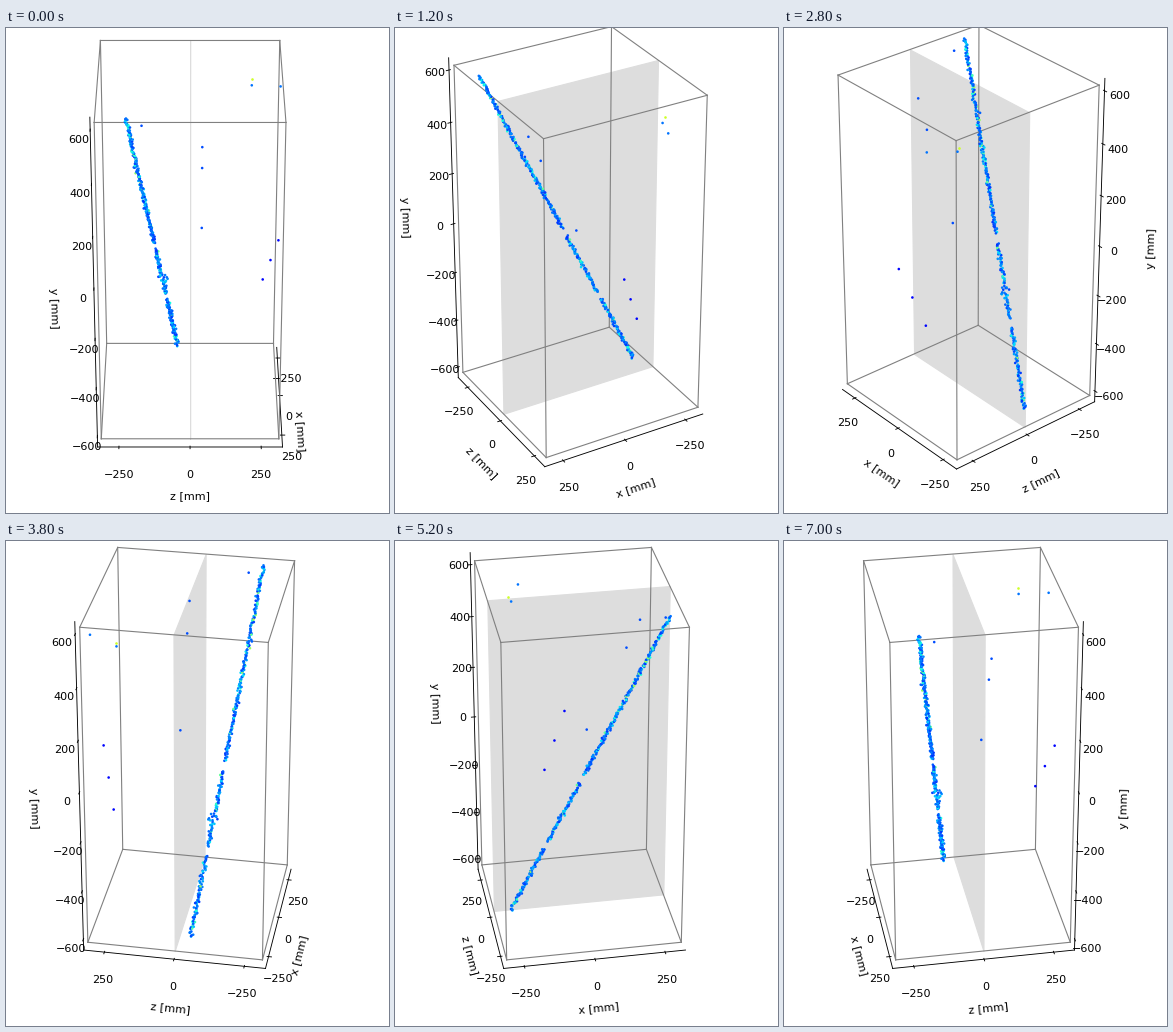
Write a matplotlib script that moves like this. It is 383 px wide and 485 px high and loops after 7.2 s.

```python
from itertools import combinations, product

import matplotlib.pyplot as plt
import numpy as np
from matplotlib.animation import FuncAnimation
from mpl_toolkits.mplot3d.art3d import Poly3DCollection

W, H, DPI = 383, 485, 80
STEPS, INTERVAL = 36, 200
HALF = np.array([310, 312, 620])    # half sizes of the box along x, z, y
MARGIN = 25 / 24                    # axis limits relative to the box
SIDE, LEFT, BOTTOM = 442, -42.9, 45.4   # square axes in pixels

rng = np.random.default_rng(7)
plt.rcParams["font.family"] = "DejaVu Sans"

fig = plt.figure(figsize=(W / DPI, H / DPI), dpi=DPI, facecolor="white")
ax = fig.add_axes([LEFT / W, BOTTOM / H, SIDE / W, SIDE / H],
                  projection="3d", computed_zorder=False)


def draw_box():
    for a, b in combinations(product((-1, 1), repeat=3), 2):
        if np.count_nonzero(np.subtract(a, b)) == 1:
            ax.plot(*np.transpose([a, b] * HALF), color="#808080", lw=1, zorder=2)


def draw_plane():
    corners = np.array([(-1, 0, -1), (1, 0, -1), (1, 0, 1), (-1, 0, 1)]) * HALF
    ax.add_collection3d(Poly3DCollection(
        [corners], facecolor="#dddddd", edgecolor="#dddddd", lw=1, zorder=1))


def draw_hits(points, level):
    """Points as (x, z, y) in box units, coloured by level from 0 to 1."""
    colors = plt.cm.jet(np.broadcast_to(level, len(points)))
    ax.scatter(*(points * HALF).T, c=colors, s=5.5, lw=0, depthshade=False, zorder=3)


def draw_track(count=420):
    """Noisy straight track with two gaps and a small side cluster."""
    top, end = (0.868, -0.675, 0.99), (-0.826, -0.148, -0.954)
    t = np.linspace(0, 1, count)
    gap = (abs(t - 0.535) < 0.013) | (abs(t - 0.765) < 0.011)
    points = np.linspace(top, end, count)
    points += rng.normal(0, 1, points.shape) * (0.01, 0.011, 0.003)
    near = abs(t - 0.675) < 0.012
    points[near, 1] += rng.uniform(-0.05, 0.05, near.sum())
    level = np.clip(0.17 + rng.gamma(2, 0.045, count), 0, 0.62)
    draw_hits(points[~gap], level[~gap])


def draw_strays():
    # a loose string of hits hopping between two depths
    k = np.arange(6)
    x = np.linspace(0.85, 0.11, k.size)
    hop = -np.sqrt(2) * np.cos(np.pi * (k / 2 + 0.25))
    draw_hits(np.column_stack([x, -0.19 + 0.32 * hop, 1.12 * x - 0.01]), 0.2)

    # a short row on the far side, and a pair near the lid with one hot hit
    draw_hits(np.linspace((-0.262, 0.831, -0.332), (0.003, 0.99, 0.003), 3), 0.13)
    pair = np.array([(-0.643, 0.685, 0.81), (-0.518, 1, 0.834)])
    draw_hits(pair, 0.24)
    draw_hits(pair[:1] + (-0.03, 0, 0.03), 0.6)


def style_axes():
    lx, lz, ly = HALF * MARGIN
    ax.set(xlim=(-lx, lx), ylim=(-lz, lz), zlim=(-ly, ly),
           xticks=(-250, 0, 250), yticks=(-250, 0, 250),
           zticks=range(-600, 601, 200))
    ax.set_xlabel("x [mm]")
    ax.set_ylabel("z [mm]")
    ax.set_zlabel("y [mm]", labelpad=20)
    ax.set_box_aspect((1, 1, 2))
    ax.grid(False)
    for axis in (ax.xaxis, ax.yaxis, ax.zaxis):
        axis.set_pane_color((1, 1, 1, 0))


def update(i):
    a = 2 * np.pi * i / STEPS
    # a tiny nudge settles which edges carry the axes in face-on views
    azim = np.degrees(np.arctan2(np.sin(a) + 1e-4, np.cos(a) + 1e-4))
    ax.view_init(elev=30, azim=azim)
    return []


draw_box()
draw_plane()
draw_track()
draw_strays()
style_axes()
anim = FuncAnimation(fig, update, frames=STEPS, interval=INTERVAL,
                     repeat=True, repeat_delay=0, blit=False)
plt.show()
```
